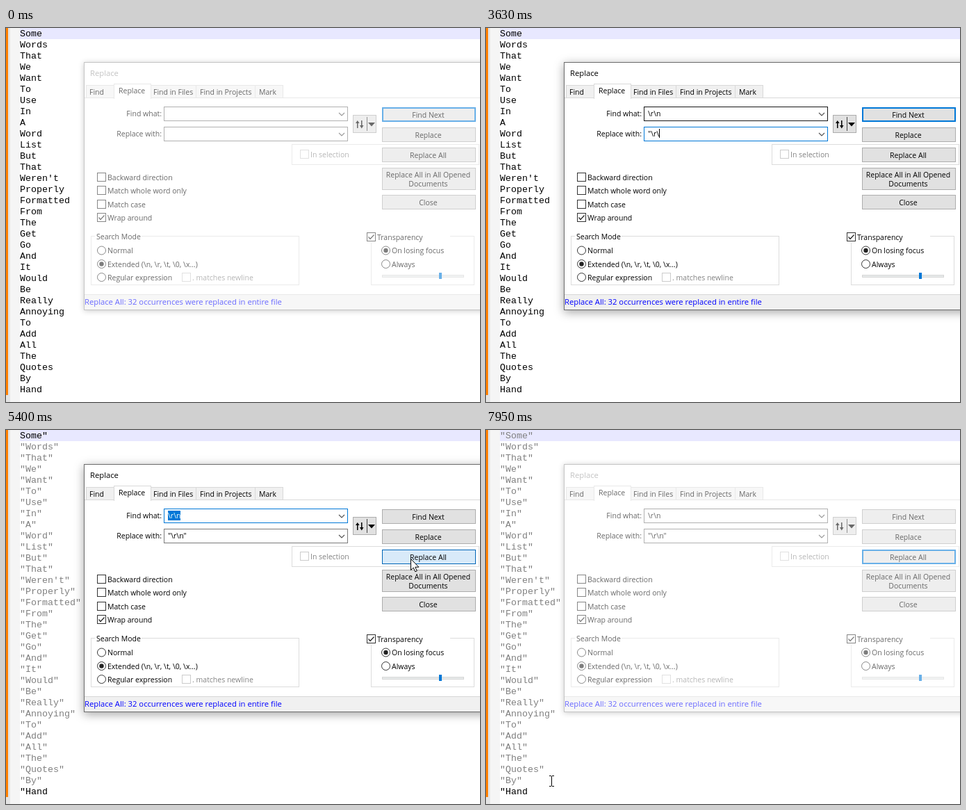
An HTML page with a canvas that plays this animation: 682 by 538 pixels, repeating every 8000 ms.

```html
<!DOCTYPE html>
<html lang="en">
<head>
<meta charset="utf-8">
<title>Find and replace</title>
<style>
html, body { margin: 0; width: 682px; height: 538px; overflow: hidden; background: #fff; }
canvas { display: block; }
</style>
</head>
<body>
<canvas id="stage" width="682" height="538"></canvas>
<script>
const g = document.getElementById('stage').getContext('2d');
const LOOP = 8000;
const WORDS = ("Some Words That We Want To Use In A Word List But That Weren't Properly Formatted " +
  'From The Get Go And It Would Be Really Annoying To Add All The Quotes By Hand').split(' ');
const MONO = '13.333px "Liberation Mono", monospace';
const UI = '10.5px "Open Sans", sans-serif';
const UI_BIG = '11.25px "Open Sans", sans-serif';
const BLUE = [0, 120, 215], NAVY = [0, 84, 153], GRAY = [122, 122, 122], DARK = [23, 23, 23];
const FACE = [225, 225, 225], EDGE = [173, 173, 173], HOT = [229, 241, 251], DOWN = [204, 228, 247];

// Event times in ms
const ACTIVATE = 765, FOCUS = 790, TAB = 2310, PRESS = 5220, RELEASE = 5310, LEAVE = 6090, QUOTE = 6990;
const FIND_KEYS = [1620, 1710, 1890, 2010];
const WITH_KEYS = [2820, 3120, 3210, 3630, 3720, 4020];

// Pointer paths: [time, x, y]
const PATHS = [
  [[270, 680, 44], [330, 625, 51], [390, 582, 66], [450, 550, 74], [510, 519, 80], [570, 488, 92],
   [640, 456, 104], [700, 436, 114], [780, 426, 118], [960, 420, 118]],
  [[4680, 420, 118], [4800, 446, 130], [4890, 530, 142], [4960, 598, 152], [5010, 600, 164],
   [5070, 589, 174], [5200, 582, 185], [5460, 582, 185]],
  [[5490, 582, 185], [5600, 520, 172], [5720, 380, 136], [5850, 180, 60], [5960, 68, 14],
   [6030, 60, 9], [6180, 81, 15]],
  [[7380, 81, 15], [7470, 112, 70], [7560, 148, 170], [7660, 156, 280], [7740, 152, 362],
   [7840, 116, 448], [7950, 94, 505]]
];
const HIDDEN = [[0, 270], [1620, 2100], [2820, 3750], [4020, 4680], [QUOTE, 7380]];

const clamp = v => Math.max(0, Math.min(1, v));
const ramp = (t, a, b) => clamp((t - a) / (b - a));
const within = (t, a, b) => t >= a && t < b;
const mix = (a, b, k) => a.map((v, i) => v + (b[i] - v) * k);
const css = c => Array.isArray(c) ? `rgb(${c.map(Math.round).join()})` : c;

function fill(x, y, w, h, color) {
  g.fillStyle = css(color);
  g.fillRect(x, y, w, h);
}
function box(x, y, w, h, inner, edge, lw = 1) {
  fill(x, y, w, h, edge);
  fill(x + lw, y + lw, w - 2 * lw, h - 2 * lw, inner);
}
function text(s, x, y, color = '#000', font = UI, align = 'left') {
  g.font = font;
  g.textAlign = align;
  g.fillStyle = color;
  g.fillText(s, x, y);
}
function line(pts, color, lw = 1) {
  g.beginPath();
  pts.forEach(([x, y]) => g.lineTo(x, y));
  g.strokeStyle = color;
  g.lineWidth = lw;
  g.stroke();
}
function shape(pts, color, edge) {
  g.beginPath();
  pts.forEach(([x, y]) => g.lineTo(x, y));
  g.closePath();
  g.fillStyle = color;
  g.fill();
  if (edge) {
    g.strokeStyle = edge;
    g.lineWidth = 1;
    g.stroke();
  }
}

function editor(t) {
  fill(0, 0, 682, 538, '#fff');
  fill(0, 0, 6, 538, '#e4e4e4');
  fill(0, 0, 3, 528, '#ff8000');
  fill(6, 0, 14, 538, '#f5f5f5');
  fill(20, 0, 662, 16, '#e8e8ff');
  const quoted = t >= RELEASE, last = WORDS.length - 1;
  WORDS.forEach((w, i) => {
    const open = quoted && (i > 0 || t >= QUOTE), close = quoted && i < last;
    text((open ? '"' : '') + w + (close ? '"' : ''), 20, 12 + i * 16, open && close ? '#808080' : '#000', MONO);
  });
  if (within(t, LEAVE, 6570)) fill(59, 0, 1, 16, '#000');
  if (within(t, 6750, QUOTE)) fill(20, 0, 1, 16, '#000');
  if (within(t, QUOTE, 7520)) fill(27, 0, 1, 16, '#000');
}

function button(y, h, label, face = FACE, edge = EDGE, lw = 1) {
  box(541, y, 135, h, face, edge, lw);
  const rows = label.split('|');
  rows.forEach((s, i) => text(s, 607.5, y + h / 2 + 4 + (i - (rows.length - 1) / 2) * 13, '#000', UI, 'center'));
}
function check(x, y, label, on, off) {
  box(x, y, 13, 13, '#fff', off ? '#ccc' : '#333');
  if (on) line([[x + 2.5, y + 6.5], [x + 5, y + 9.5], [x + 10.5, y + 3.5]], '#222', 1.2);
  text(label, x + 15, y + 11, off ? '#838383' : '#000');
}
function radio(x, y, label, on) {
  g.beginPath();
  g.arc(x, y, 6, 0, 7);
  g.strokeStyle = '#333';
  g.lineWidth = 1;
  g.stroke();
  if (on) {
    g.beginPath();
    g.arc(x, y, 3.2, 0, 7);
    g.fillStyle = '#222';
    g.fill();
  }
  text(label, x + 8.5, y + 4);
}
function field(y, label, value, edge, caret, selected) {
  text(label, 224, y + 14, '#000', UI, 'right');
  box(227, y, 265, 21, '#fff', edge);
  g.font = UI;
  const w = Math.round(g.measureText(value).width);
  if (selected) fill(233, y + 3, w, 14, BLUE);
  text(value, 233, y + 14, selected ? '#fff' : '#000');
  if (caret) fill(233 + w, y + 3, 1, 13, '#000');
  line([[479, y + 9], [483, y + 13], [487, y + 9]], '#555', 1.2);
}
function tabs() {
  fill(113, 100, 570, 1, '#d9d9d9');
  [['Find', 115, 41, 120], ['Find in Files', 207, 67, 212], ['Find in Projects', 273, 86, 279], ['Mark', 358, 41, 364]]
    .forEach(([s, x, w, tx]) => {
      box(x, 82, w, 19, '#f0f0f0', '#d9d9d9');
      text(s, tx, 96);
    });
  box(155, 80, 54, 22, '#fff', '#d9d9d9');
  fill(156, 100, 52, 2, '#fff');
  text('Replace', 162, 94);
}
function swapButton() {
  box(499, 125, 34, 26, FACE, EDGE);
  fill(519, 128, 1, 20, '#444');
  fill(505, 135, 1.5, 9, '#000');
  shape([[503, 137], [505.75, 133], [508.5, 137]], '#000');
  fill(511, 133, 1.5, 9, '#000');
  shape([[509, 140], [511.75, 144.5], [514.5, 140]], '#000');
  shape([[521, 136], [531, 136], [526, 141.5]], '#000');
}

function fields(t) {
  const typed = (s, keys) => s.slice(0, keys.filter(k => t >= k).length);
  const move = ramp(t, TAB, TAB + 240), selected = within(t, RELEASE, LEAVE);
  let findEdge = GRAY, withEdge = GRAY;
  if (within(t, 660, 4850)) findEdge = mix(GRAY, DARK, ramp(t, 660, 760) * (1 - ramp(t, 4740, 4850)));
  if (within(t, TAB, PRESS)) withEdge = mix(GRAY, BLUE, move);
  if (selected) findEdge = mix(GRAY, BLUE, ramp(t, RELEASE, RELEASE + 90));
  const findCaret = within(t, FOCUS, 1320) || within(t, 1620, TAB);
  const withCaret = within(t, TAB, 4530);
  field(113, 'Find what:', typed('\\r\\n', FIND_KEYS), findEdge, findCaret, selected);
  field(142, 'Replace with:', typed('"\\r\\n"', WITH_KEYS), withEdge, withCaret);
}

function buttons(t) {
  const done = t >= PRESS;
  button(114, 21, 'Find Next', FACE, done ? EDGE : BLUE, done ? 1 : 2);
  const hotReplace = ramp(t, 4940, 5000) * (1 - ramp(t, 5020, 5150));
  button(143, 21, 'Replace', mix(FACE, HOT, hotReplace), mix(EDGE, BLUE, hotReplace * 0.6));
  const hot = ramp(t, 5010, 5090) * (1 - ramp(t, 5560, 5700));
  let face = mix(FACE, HOT, hot), edge = done ? BLUE : mix(EDGE, BLUE, hot);
  if (within(t, PRESS, 5500)) {
    const lift = ramp(t, RELEASE, 5500);
    face = mix(DOWN, HOT, lift);
    edge = mix(NAVY, BLUE, lift);
  }
  box(411, 167, 270, 30, '#fff', '#dcdcdc');
  check(423, 175, 'In selection', false, true);
  button(172, 21, 'Replace All', face, edge, t >= 5560 ? 2 : 1);
  button(201, 32, 'Replace All in All Opened|Documents');
  button(240, 21, 'Close');
}

function options() {
  check(131, 208, 'Backward direction');
  check(131, 227, 'Match whole word only');
  check(131, 247, 'Match case');
  check(131, 266, 'Wrap around', true);

  box(122, 299, 300, 71, '#fff', '#dcdcdc');
  fill(128, 298, 67, 3, '#fff');
  text('Search Mode', 130, 304);
  radio(137.5, 320, 'Normal');
  radio(137.5, 339.5, 'Extended (\\n, \\r, \\t, \\0, \\x...)', true);
  radio(137.5, 358.5, 'Regular expression');
  check(253, 352, '. matches newline', false, true);

  box(525, 299, 149, 71, '#fff', '#dcdcdc');
  fill(519, 294, 120, 14, '#fff');
  check(519, 294, 'Transparency', true);
  radio(546.5, 320, 'On losing focus', true);
  radio(546.5, 339.5, 'Always');
  box(541, 355, 118, 4, '#e7eaea', '#d6d6d6');
  fill(623, 352, 4, 9, BLUE);
}

function dialog(t) {
  const active = within(t, ACTIVATE, LEAVE);
  g.save();
  g.shadowColor = `rgba(0,0,0,${active ? 0.36 : 0.2})`;
  g.shadowBlur = active ? 13 : 8;
  g.shadowOffsetY = active ? 3 : 1;
  fill(112, 49, 600, 357, '#fff');
  g.restore();
  box(112, 49, 600, 357, '#fff', active ? '#6c6c6c' : '#9a9a9a');
  text('Replace', 121, 69, active ? '#000' : '#999', UI_BIG);
  tabs();
  fields(t);
  swapButton();
  buttons(t);
  options();
  fill(113, 383, 569, 1, '#d7d7d7');
  fill(113, 384, 569, 21, '#f0f0f0');
  text('Replace All: 32 occurrences were replaced in entire file', 113, 398, '#00f', UI_BIG);
  if (!active) fill(112, 49, 570, 357, 'rgba(255,255,255,.412)');
}

function pointerAt(t) {
  const path = PATHS.filter(p => t >= p[0][0]).pop();
  const i = path.findIndex(p => p[0] > t);
  if (i < 0) return path[path.length - 1].slice(1);
  const a = path[i - 1], b = path[i], k = ramp(t, a[0], b[0]);
  return mix(a, b, k).slice(1).map(Math.round);
}
function pointer(t) {
  if (HIDDEN.some(([a, b]) => within(t, a, b))) return;
  const [x, y] = pointerAt(t);
  const inDialog = x >= 112 && y >= 49 && y <= 405;
  const inField = within(x, 228, 474) && (within(y, 113, 134) || within(y, 142, 163));
  if (inField || (!inDialog && x > 20)) {
    fill(x, y - 7, 1, 14, '#000');
    [-8, 7].forEach(d => {
      fill(x - 3, y + d, 3, 1, '#000');
      fill(x + 1, y + d, 3, 1, '#000');
    });
  } else {
    const pts = [[0, 0], [0, 16], [3.7, 12.6], [6.3, 18.3], [8.8, 17.2], [6.3, 11.7], [11.4, 11.7]];
    shape(pts.map(([dx, dy]) => [x + dx + 0.5, y + dy + 0.5]), '#fff', '#000');
  }
}

function frame(now) {
  const t = now % LOOP;
  editor(t);
  dialog(t);
  pointer(t);
  requestAnimationFrame(frame);
}
requestAnimationFrame(frame);
</script>
</body>
</html>
```
